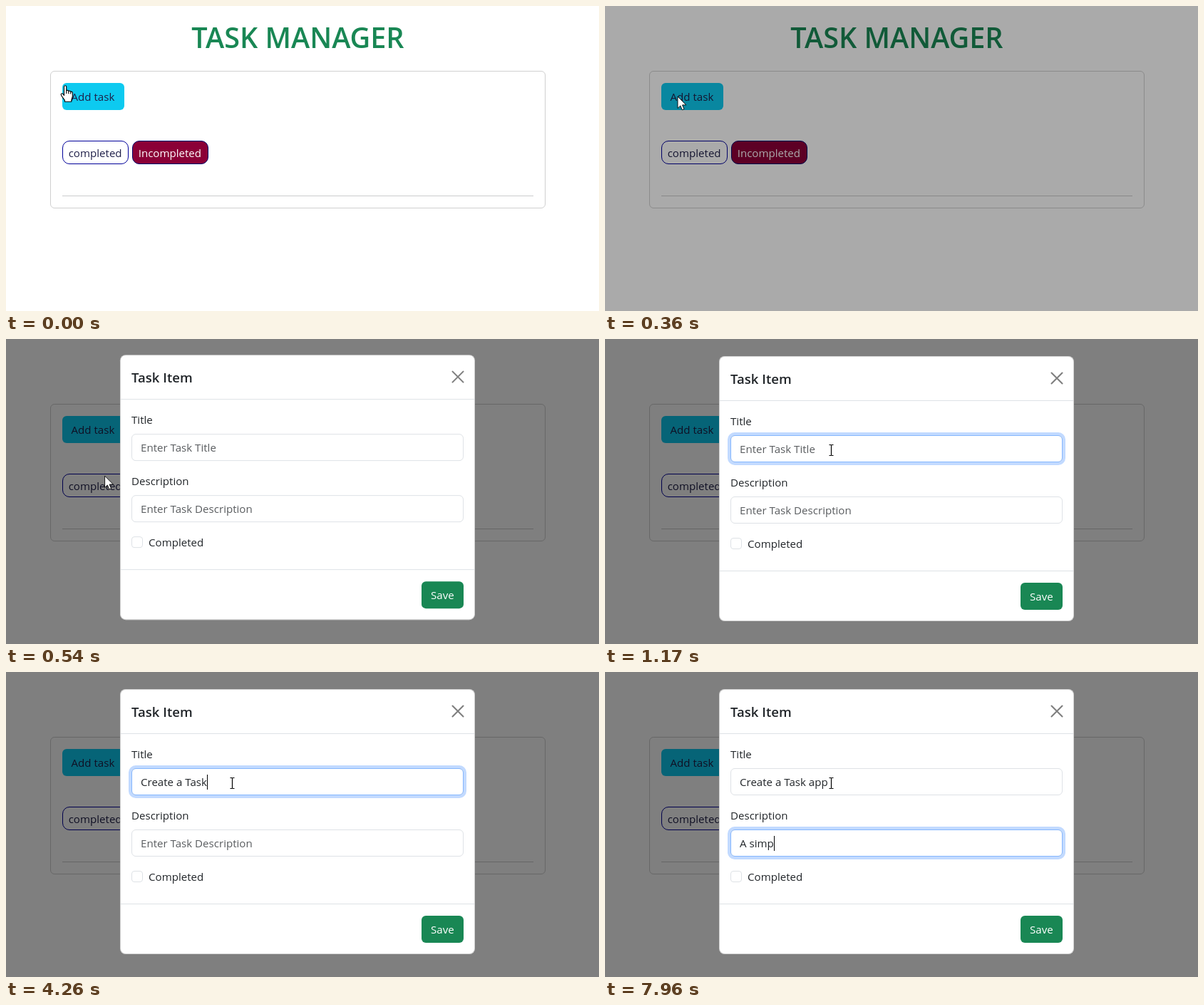
Recreate the animation shown at these times as an HTML page. Size 832x428 px, loop 8000 ms.

```html
<!DOCTYPE html>
<html lang="en">
<head>
<meta charset="utf-8">
<title>Task manager</title>
<style>
  html, body { margin: 0; width: 100%; height: 100%; overflow: hidden; background: #fff; }
  svg { display: block; width: 832px; height: 428px; }
  text { font: 15.1px "Open Sans", "Noto Sans", sans-serif; fill: #212529; white-space: pre; }
  .h1 { font-size: 39.6px; font-weight: 600; fill: #198754; text-anchor: middle; }
  .h5 { font-size: 18.6px; font-weight: 600; }
  .light { fill: #fff; }
  .navy { fill: #1f1f48; }
  .hint { fill: #212529; fill-opacity: .75; }
  .line { fill: none; stroke: #dee2e6; }
  .ring { fill: none; stroke: #0d6efd; stroke-opacity: .25; stroke-width: 4; }
</style>
</head>
<body>
<svg viewBox="0 0 832 428">
  <rect width="832" height="428" fill="#fff"/>
  <text class="h1" x="409.5" y="59">TASK MANAGER</text>
  <rect x="62.5" y="91.5" width="694" height="192" rx="5.5" fill="none" stroke="#d0d0d0"/>
  <rect x="79" y="108" width="87" height="38" rx="6" fill="#0dcaf0"/>
  <text class="navy" x="91.5" y="133">Add task</text>
  <rect x="79.5" y="189.5" width="92" height="32" rx="9.5" fill="#fff" stroke="#00009a"/>
  <text class="navy" x="87.7" y="212">completed</text>
  <rect x="177.5" y="189.5" width="106" height="32" rx="9.5" fill="#8b0037" stroke="#00006e"/>
  <text class="light" x="185.7" y="212">Incompleted</text>
  <path d="M79 266.5H740" stroke="#cbcccd"/>

  <rect id="shade" width="832" height="428" opacity="0"/>

  <g id="modal" opacity="0">
    <rect x="160" y="24" width="498" height="372" rx="8" fill="#fff"/>
    <rect x="160.5" y="24.5" width="497" height="371" rx="7.5" fill="none" stroke="#000" stroke-opacity=".175"/>
    <text class="h5" x="176" y="63">Task Item</text>
    <path d="M626.5 47.5l15 15m0-15l-15 15" stroke="#000" stroke-opacity=".5" stroke-width="2.1" stroke-linecap="round"/>
    <path class="line" d="M161 86.5H657M161 325.5H657"/>
    <text x="176" y="121">Title</text>
    <text x="176" y="207">Description</text>
    <g id="fields"></g>
    <rect class="line" x="176.5" y="279.5" width="15" height="15" rx="3.5"/>
    <text x="200" y="293">Completed</text>
    <rect x="583" y="342" width="59" height="38" rx="6" fill="#198754"/>
    <text class="light" x="596" y="367">Save</text>
  </g>

  <g id="pointer">
    <path id="arrow" d="M0 0V16.5L3.8 12.9L6.3 18.8L9 17.6L6.5 11.9H11.8Z" fill="#fff" stroke="#000" stroke-width=".9"/>
    <path id="hand" d="M-1.5 1.2C-1.5 -.7 1.7 -.7 1.7 1.2V7C2.4 6 4.6 6.2 4.8 7.7C5.6 6.7 7.5 7 7.7 8.5C8.6 7.7 10.3 8.3 10.3 9.8V14.6C10.3 17 8.8 18.4 8.8 20.5V22.3H-.6V20.4C-1.8 18.4 -4.5 15.6 -5.7 12.8C-6.4 11 -4.2 10.1 -3 11.6L-1.5 13.5ZM1.7 7V11M4.8 8V11.3M7.7 8.8V11.6" fill="#fff" stroke="#000" stroke-width="1.1" stroke-linejoin="round"/>
    <path id="beam" d="M-3 -7.5H-1L0 -7L1 -7.5H3M0 -7V7M-3 7.5H-1L0 7L1 7.5H3" fill="none" stroke="#000" stroke-width="1.2"/>
  </g>
</svg>
<script>
const LOOP = 8000;
const $ = id => document.getElementById(id);
const NS = 'http://www.w3.org/2000/svg';

function add(parent, tag, attrs) {
  const el = document.createElementNS(NS, tag);
  for (const k in attrs) el.setAttribute(k, attrs[k]);
  return parent.appendChild(el);
}

function makeField(y, hint) {
  const box = $('fields');
  const ring = add(box, 'rect', { class: 'ring', x: 174, y: y - 2, width: 470, height: 42, rx: 8 });
  add(box, 'rect', { class: 'line', x: 176.5, y: y + .5, width: 465, height: 37, rx: 5.5 });
  const edge = add(box, 'rect', { x: 176.5, y: y + .5, width: 465, height: 37, rx: 5.5, fill: 'none', stroke: '#86b7fe' });
  const label = add(box, 'text', { x: 189, y: y + 25 });
  const caret = add(box, 'rect', { y: y + 9, width: 1, height: 21 });
  return { hint, ring, edge, label, caret };
}

const title = makeField(135, 'Enter Task Title');
const about = makeField(221, 'Enter Task Description');

// Focus spans, moments each character appears, and moments the caret flips
const FOCUS = 990, TAB = 5440, FADE = 60;
const TITLE = 'Create a Task app', ABOUT = 'A simp';
const titleKeys = [2680, 2800, 2910, 3030, 3270, 3350, 3460, 3570, 3690, 3800, 3910, 4030, 4150, 4490, 4590, 4700, 4820];
const aboutKeys = [7270, 7400, 7510, 7760, 7860, 7960];
const titleFlips = [1170, 1348, 1526, 1704, 1882, 2060, 2230, 2410, 2590, 2680, 5000, 5180, 5350];
const aboutFlips = [5620, 5800, 5976, 6150, 6328, 6500, 6680, 6855, 7030, 7200];

const path = [
  [0, 83, 112], [20, 83, 112], [200, 102, 127], [440, 102, 127],
  [540, 138, 192], [660, 205, 204], [800, 285, 170], [920, 317.5, 156]
];

const clamp = v => Math.max(0, Math.min(1, v));
const ramp = (t, start, span) => clamp((t - start) / span);
const passed = (list, t) => list.filter(k => k <= t).length;

// cubic-bezier(0, 0, .58, 1)
function easeOut(x) {
  let lo = 0, hi = 1;
  for (let i = 0; i < 24; i++) {
    const s = (lo + hi) / 2;
    if (1.74 * (1 - s) * s * s + s ** 3 < x) lo = s; else hi = s;
  }
  return 3 * (1 - lo) * lo * lo + lo ** 3;
}

function place(t) {
  const i = path.findIndex(p => p[0] > t);
  if (i < 0) return path[path.length - 1].slice(1);
  const [t0, x0, y0] = path[i - 1], [t1, x1, y1] = path[i];
  const k = (t - t0) / (t1 - t0);
  return [x0 + (x1 - x0) * k, y0 + (y1 - y0) * k];
}

function drawField(f, typed, glow, caretOn) {
  f.label.textContent = typed || f.hint;
  f.label.setAttribute('class', typed ? '' : 'hint');
  f.ring.setAttribute('opacity', glow);
  f.edge.setAttribute('opacity', glow);
  f.caret.setAttribute('opacity', caretOn ? 1 : 0);
  if (caretOn) {
    const w = typed ? f.label.getComputedTextLength() : 0;
    f.caret.setAttribute('x', Math.round(189 + w));
  }
}

function draw(t) {
  $('shade').setAttribute('opacity', .5 * ramp(t, 302, 88));
  $('modal').setAttribute('opacity', ramp(t, 390, 89));
  const lift = -50 * (1 - easeOut(ramp(t, 390, 178)));
  $('modal').setAttribute('transform', `translate(0 ${t >= 568 ? 0 : lift.toFixed(2)})`);

  const swap = ramp(t, TAB, FADE);
  const even = flips => passed(flips, t) % 2 === 0;
  drawField(title, TITLE.slice(0, passed(titleKeys, t)),
    ramp(t, FOCUS, FADE) * (1 - swap), t >= FOCUS && t < TAB && even(titleFlips));
  drawField(about, ABOUT.slice(0, passed(aboutKeys, t)),
    swap, t >= TAB && even(aboutFlips));

  const [x, y] = place(t);
  const inside = (a, b) => y > a && y < b;
  const overInput = t > 568 && x > 176 && (inside(135, 173) || inside(221, 259));
  const kind = t < 302 ? 'hand' : overInput ? 'beam' : 'arrow';
  for (const id of ['hand', 'arrow', 'beam']) $(id).style.display = id === kind ? '' : 'none';
  $('pointer').setAttribute('transform', `translate(${x.toFixed(1)} ${y.toFixed(1)})`);
}

const began = performance.now();
function tick() {
  draw((performance.now() - began) % LOOP);
  requestAnimationFrame(tick);
}
tick();
</script>
</body>
</html>
```
